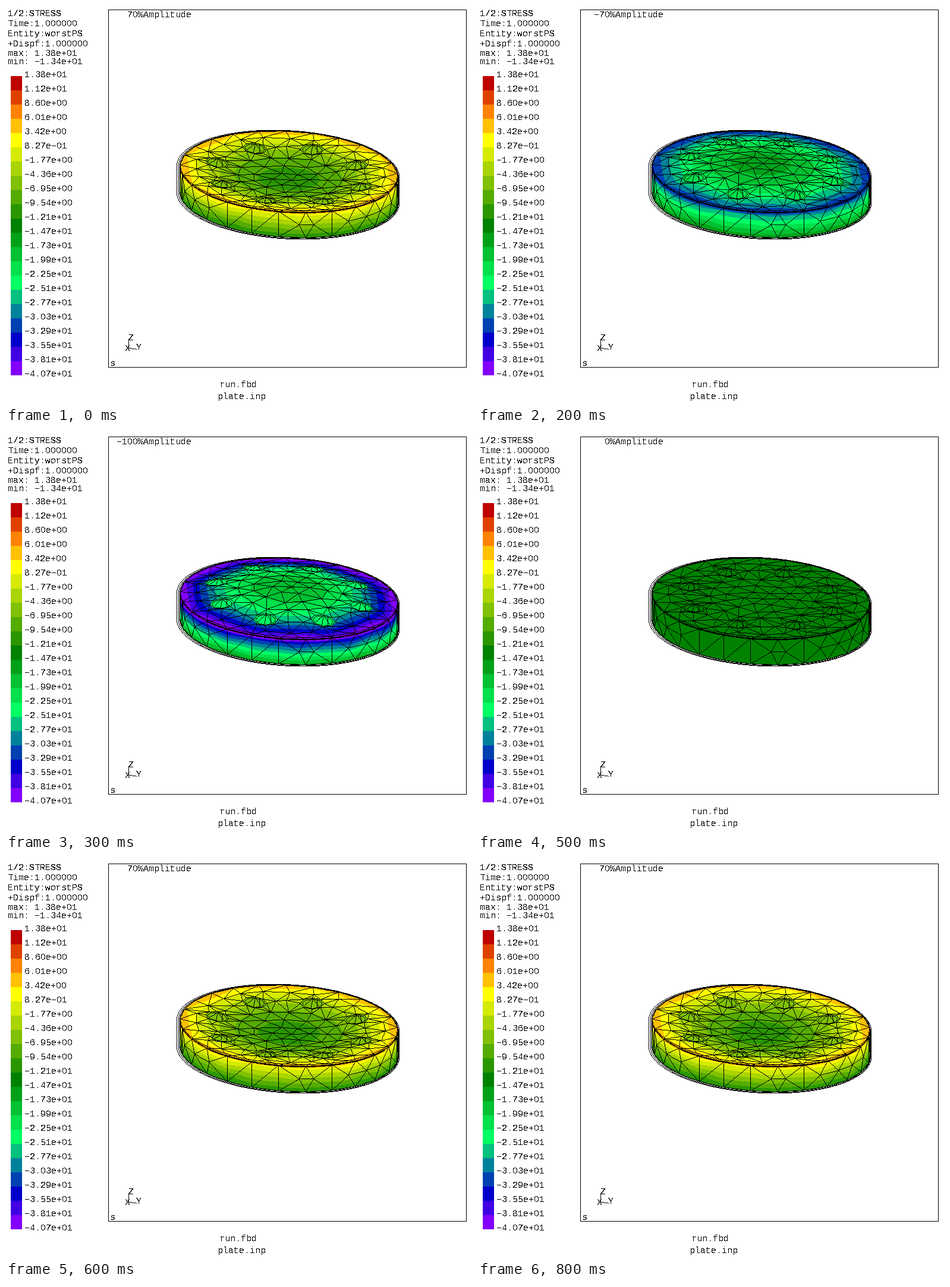
A matplotlib script for the animation above (900 ms loop, 784 px wide and 672 px high).

```python
import numpy as np
import matplotlib.pyplot as plt
from matplotlib.animation import FuncAnimation
from matplotlib.patches import Polygon, Rectangle
from matplotlib.tri import LinearTriInterpolator, Triangulation

plt.rcParams.update({
    "font.family": "Liberation Mono",
    "text.antialiased": False,
    "text.hinting": "force_autohint",
    "text.hinting_factor": 1,
})

W, H, DPI = 784, 672, 64
PX = 72 / DPI            # one pixel in points
FRAMES, STEP = 9, 100
CX, CY = 476, 279        # centre of the top face
A, B, SKEW = 183.5, 67.9, 9
DEPTH = 43
DIP = 20                 # sag of the centre at full amplitude, in pixels
HOLE_R, HOLE_POS = 0.109, 0.69
HOLE_ANGLES = np.radians(18 + 45 * np.arange(8))

STOPS = [0, 2, 4, 10, 14, 16, 18, 20]
STOP_RGB = np.array([
    (190, 0, 0), (255, 130, 0), (255, 255, 0), (0, 130, 0),
    (0, 255, 100), (0, 130, 155), (0, 0, 200), (130, 0, 255)])
PALETTE = np.stack(
    [np.interp(range(21), STOPS, STOP_RGB[:, c]) for c in range(3)], 1) / 255

fig = plt.figure(figsize=(W / DPI, H / DPI), dpi=DPI, facecolor="white")
ax = fig.add_axes([0, 0, 1, 1])
ax.axis("off")

# All lines are hard one-pixel strokes on a transparent layer.
base = np.zeros((H, W, 4), np.uint8)
layer = ax.imshow(base, extent=(0, W, H, 0), interpolation="nearest",
                  aspect="auto", zorder=6)
ax.set_xlim(0, W)
ax.set_ylim(H, 0)


def plain(text):
    # The letter O stands for zero, which has a dot in this typeface.
    return text.replace("0", "O").replace("-", "\u2212")


def label(x, y, text):
    return ax.text(x, y, plain(text), fontsize=15 * PX, va="baseline", zorder=9)


def ink(canvas, segments):
    for (x0, y0), (x1, y1) in segments:
        n = int(max(abs(x1 - x0), abs(y1 - y0))) + 2
        cols = np.linspace(x0, x1, n).astype(int)
        rows = np.linspace(y0, y1, n).astype(int)
        canvas[rows, cols, 3] = 255


def chain(x, y):
    """Segments of an open polyline."""
    p = np.column_stack([x, y])
    return np.stack([p[:-1], p[1:]], 1)


def loop(x, y):
    return chain(np.r_[x, x[0]], np.r_[y, y[0]])


def mesh_lines(x, y, edges):
    return np.column_stack([x, y])[edges]


def project(u, v, amp=0.0, drop=0.0):
    """Map a point of the unit disc to the stage."""
    sag = np.clip(1 - u * u - v * v, 0, 1) ** 1.5
    return CX + A * u, CY + SKEW * u + B * v + DIP * amp * sag + drop


def ring(u0, v0, r, n):
    t = 2 * np.pi * np.arange(n) / n
    return np.column_stack([u0 + r * np.cos(t), v0 + r * np.sin(t)])


def top_load(u, v):
    r, t = np.hypot(u, v), np.arctan2(v, u)
    lobes = 0.5 * np.cos(8 * (t - HOLE_ANGLES[0])) * r ** 6
    return 1 + 6.2 * r ** 2.1 - lobes


def side_load(depth):
    return 6.4 - 5.9 * depth


def sample(mesh, values, x, y, rest):
    """Interpolate over the triangles, and use rest beyond their hull."""
    got = LinearTriInterpolator(mesh, values)(x, y)
    return np.where(np.ma.getmaskarray(got), rest, got.filled(0))


# Top mesh: loose rings of nodes around the holes
rng = np.random.default_rng(4)
centres = HOLE_POS * np.column_stack([np.cos(HOLE_ANGLES), np.sin(HOLE_ANGLES)])
loose = np.vstack([ring(0, 0, r, n) for r, n in
                   [(0, 1), (0.17, 6), (0.33, 11), (0.49, 16),
                    (0.69, 32), (0.87, 24)]])
loose += rng.uniform(-0.025, 0.025, loose.shape)
gap = np.hypot(*(loose[:, None] - centres).transpose(2, 0, 1)).min(1)
loose = loose[gap > HOLE_R + 0.04]
rim_t = np.radians(52.3 + 14.4 * np.arange(25))
rim = np.column_stack([np.cos(rim_t), np.sin(rim_t)])
nodes = np.vstack([rim, loose] + [ring(*c, HOLE_R, 8) for c in centres])
top = Triangulation(*nodes.T)

rr, tt = np.meshgrid(np.linspace(0, 1, 70), np.linspace(0, 2 * np.pi, 181))
top_u, top_v = rr * np.cos(tt), rr * np.sin(tt)
top_s = sample(top, top_load(*nodes.T), top_u, top_v, top_load(top_u, top_v))

mid = nodes[top.triangles].mean(1)
top.set_mask(np.hypot(*(mid[:, None] - centres).transpose(2, 0, 1)).min(1) < 0.1)
top_edges = top.edges

# Side mesh: rim nodes above and below, a few nodes halfway
wall_t = np.degrees(rim_t) % 360
wall_t = np.r_[0, np.sort(wall_t[wall_t < 180]), 180]
star_t = np.array([20, 33, 44.5, 57, 76.8, 84.7, 137, 150, 163])
side_t = np.radians(np.r_[wall_t, wall_t, star_t])
side_d = np.r_[0 * wall_t, 0 * wall_t + 1, 0 * star_t + 0.5]
side = Triangulation(side_t * A, side_d * DEPTH)
side_x, side_y = project(np.cos(side_t), np.sin(side_t), 0, side_d * DEPTH)

st, sd = np.meshgrid(np.linspace(0, np.pi, 181), np.linspace(0, 1, 45))
wall_x, wall_y = project(np.cos(st), np.sin(st), 0, sd * DEPTH)
noisy = side_load(side_d) + rng.uniform(-0.4, 0.4, side_d.size)
side_s = sample(side, noisy, st * A, sd * DEPTH, side_load(sd))
side_s = np.where(sd < 0.08, 7.4, side_s)

# Fan of wall edges seen inside each hole
FAN = HOLE_R * np.array([
    [(0.05, -0.9), p] for p in [(-0.6, 0.3), (-0.1, 0.75), (0.55, 0.5)]]
    + [[(0.4, -0.8), (0.42, 0.6)]])

patches = []


def paint(x, y, load, amp, z):
    index = np.clip(10.5 - load * amp / 0.7, 0.01, 20.99)
    patches.append(ax.contourf(x, y, index, levels=np.arange(22),
                               colors=PALETTE, antialiased=False, zorder=z))


def draw_holes(canvas, amp):
    color = PALETTE[int(np.clip(10.5 - 2.5 * amp / 0.7, 0, 20))]
    for c in centres:
        x, y = project(*ring(*c, HOLE_R, 8).T, amp)
        patches.append(ax.add_patch(Polygon(
            np.column_stack([x, y]), fc=color, lw=0, aa=False, zorder=5)))
        ink(canvas, loop(x, y))
        ink(canvas, loop(*project(*ring(*c, HOLE_R * 0.84, 8).T, amp, 0.5)))
        spokes = FAN + c
        ink(canvas, np.stack(project(spokes[..., 0], spokes[..., 1], amp), -1))


def draw_outline():
    back = np.linspace(np.pi, 2 * np.pi, 50)
    front = np.linspace(0, np.pi, 50)
    t = np.r_[back, front]
    drop = np.r_[0 * back, 0 * front + DEPTH + 1]
    for k, shift in [(1.02, -1.5), (1.008, -0.7)]:
        x = CX + shift + k * A * np.cos(t)
        y = CY + k * (SKEW * np.cos(t) + B * np.sin(t)) + drop
        ink(base, loop(x, y))


def draw_body():
    def arc(start, end, drop):
        t = np.linspace(start, end, 60)
        ink(base, chain(*project(np.cos(t), np.sin(t), 0, drop)))

    arc(np.pi, 2 * np.pi, 0)
    for drop in (-3, 0, DEPTH):
        arc(0, np.pi, drop)
    arc(0.5, 2.4, 1)
    ink(base, mesh_lines(side_x, side_y, side.edges))


def draw_panel():
    head = ["1/2:STRESS", "Time:1.000000", "Entity:worstPS",
            "+Dispf:1.000000", "max: 1.38e+01", "min: -1.34e+01"]
    for y, text in zip([17, 34, 51, 68, 84, 98], head):
        label(3, y, text)
    for k, color in enumerate(PALETTE):
        ax.add_patch(Rectangle((8, 118 + 24 * k), 19, 24, fc=color, lw=0, aa=False))
    for k in range(22):
        label(31, 120 + 24 * k, f"{13.789 - 2.5924 * k:.2e}")
    ink(base, loop(np.array([172, 774, 774, 172]), np.array([6, 6, 608, 608])))
    label(175, 606, "s")
    label(360, 642, "run.fbd")
    label(356, 662, "plate.inp")
    ink(base, chain([206, 206, 219], [562, 576, 578]))
    for x, y, name in [(205, 563, "Z"), (219, 579, "Y"), (200, 581, "X")]:
        label(x, y, name)


draw_panel()
draw_outline()
draw_body()
caption = label(0, 19, "")


def update(i):
    while patches:
        patches.pop().remove()
    amp = np.cos(np.pi / 4 * (i - 7))
    text = f"{int(100 * amp)}%Amplitude"
    caption.set_text(plain(text))
    caption.set_x(312 - 9 * len(text))
    canvas = base.copy()
    paint(wall_x, wall_y, side_s, amp, 2)
    paint(*project(top_u, top_v, amp), top_s, amp, 3)
    ink(canvas, mesh_lines(*project(*nodes.T, amp), top_edges))
    draw_holes(canvas, amp)
    layer.set_data(canvas)
    return [layer, caption]


anim = FuncAnimation(fig, update, frames=FRAMES, interval=STEP,
                     init_func=lambda: [], repeat=True, repeat_delay=0,
                     blit=False)
plt.show()
```
